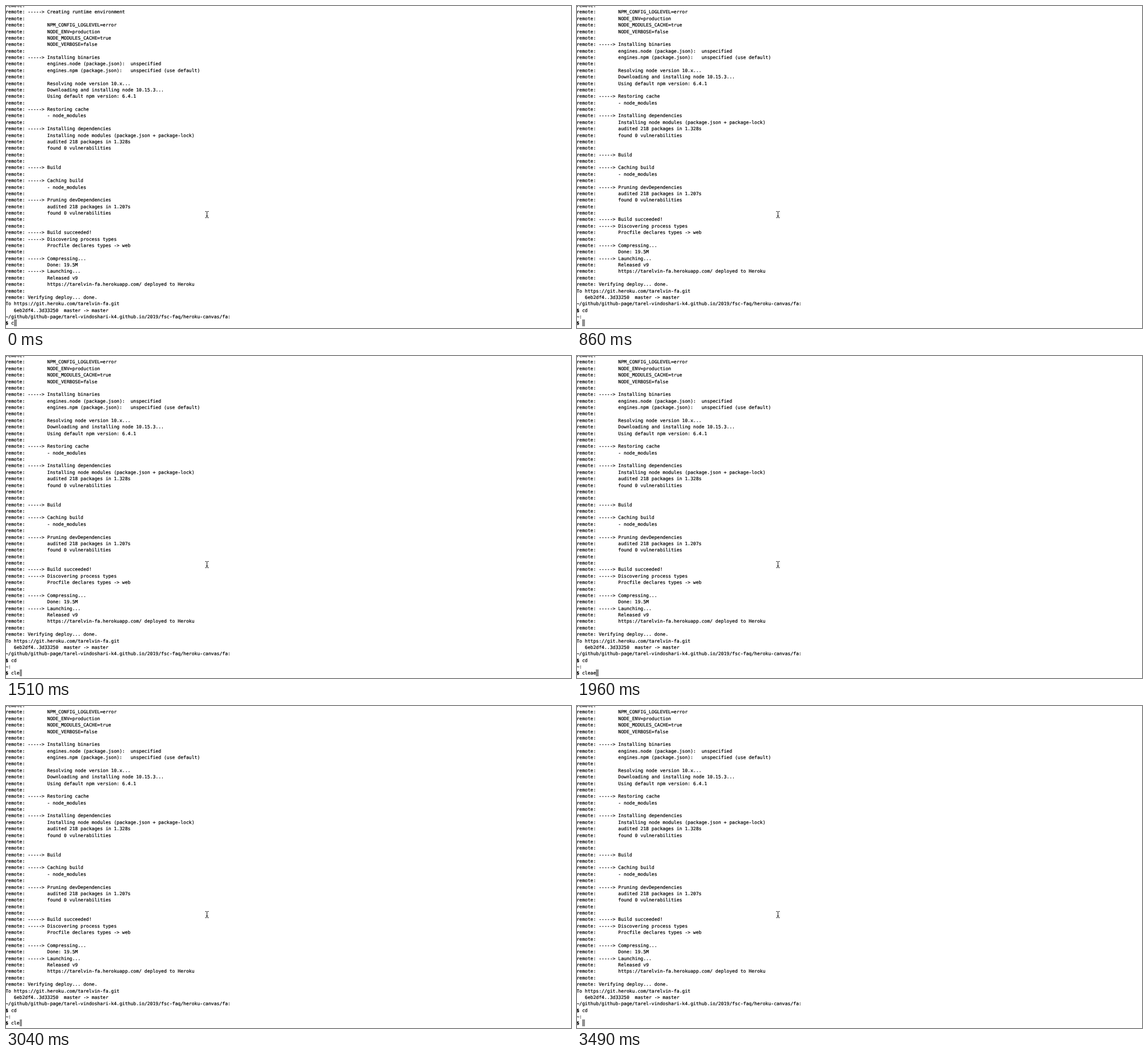
Recreate the animation shown at these times as an HTML page. Size 991x565 px, loop 8 s.

```html
<!DOCTYPE html>
<html lang="en">
<head>
<meta charset="utf-8">
<title>Terminal</title>
<style>
html, body { margin: 0; width: 100%; height: 100%; overflow: hidden; background: #fff; }
#stage {
  position: relative; width: 991px; height: 565px; overflow: hidden; color: #000;
  font: 8.11px/11.375px "DejaVu Sans Mono", monospace;
  text-rendering: geometricPrecision; font-variant-ligatures: none;
  -webkit-text-stroke: 0.2px #000;
}
pre { position: absolute; left: -0.8px; bottom: 2.25px; margin: 0; font: inherit; }
#caret { position: absolute; top: 550.4px; width: 1ch; height: 11.375px; background: #929292; }
svg { position: absolute; left: 348px; top: 359px; }
</style>
</head>
<body>
<div id="stage">
  <div id="caret"></div>
  <pre id="screen"></pre>
  <svg width="9" height="14" fill="none" stroke="#111">
    <path d="M1.5 1.5H3.5L4.5 2.5L5.5 1.5H7.5M4.5 2V12M1.5 12.5H3.5L4.5 11.5L5.5 12.5H7.5M3 9.5H6"/>
  </svg>
</div>
<script>
// Lines starting with ">" are build steps, the others are their details.
const build = `
>Creating runtime environment

NPM_CONFIG_LOGLEVEL=error
NODE_ENV=production
NODE_MODULES_CACHE=true
NODE_VERBOSE=false

>Installing binaries
engines.node (package.json):  unspecified
engines.npm (package.json):   unspecified (use default)

Resolving node version 10.x...
Downloading and installing node 10.15.3...
Using default npm version: 6.4.1

>Restoring cache
- node_modules

>Installing dependencies
Installing node modules (package.json + package-lock)
audited 218 packages in 1.328s
found 0 vulnerabilities


>Build

>Caching build
- node_modules

>Pruning devDependencies
audited 218 packages in 1.207s
found 0 vulnerabilities


>Build succeeded!
>Discovering process types
Procfile declares types -> web

>Compressing...
Done: 19.5M
>Launching...
Released v9
https://tarelvin-fa.herokuapp.com/ deployed to Heroku
`.split('\n').map(line =>
  'remote:' + (line[0] === '>' ? ' -----> ' + line.slice(1) : ' '.repeat(8) + line));

const prompt = '<b>$</b> ';
const log = [
  ...build,
  'remote: Verifying deploy... done.',
  'To https://git.heroku.com/tarelvin-fa.git',
  '   6eb2df4..3d33250  master -> master',
  '~/github/github-page/tarel-vindoshari-k4.github.io/2019/fsc-faq/heroku-canvas/fa:',
  prompt
].join('\n');

const LOOP = 8000, ENTER = 860;
const keys = [
  [0, 'c'], [80, 'cd'], [ENTER, ''],
  [1310, 'c'], [1400, 'cl'], [1510, 'cle'], [1690, 'clea'], [1960, 'cleae'],
  [2590, 'clea'], [3040, 'cle'], [3220, 'cl'], [3400, 'c'], [3490, '']
];

const screen = document.getElementById('screen');
const caret = document.getElementById('caret');
const start = performance.now();
let shown;

function draw(now) {
  const t = Math.max(0, now - start) % LOOP;
  const key = keys.findLast(([time]) => time <= t);
  if (key !== shown) {
    shown = key;
    const typed = key[1];
    screen.innerHTML = log + (t < ENTER ? '' : 'cd\n~:\n' + prompt) + typed;
    caret.style.left = `calc(${typed.length + 2}ch - 0.8px)`;
  }
  requestAnimationFrame(draw);
}
draw(start);
</script>
</body>
</html>
```
